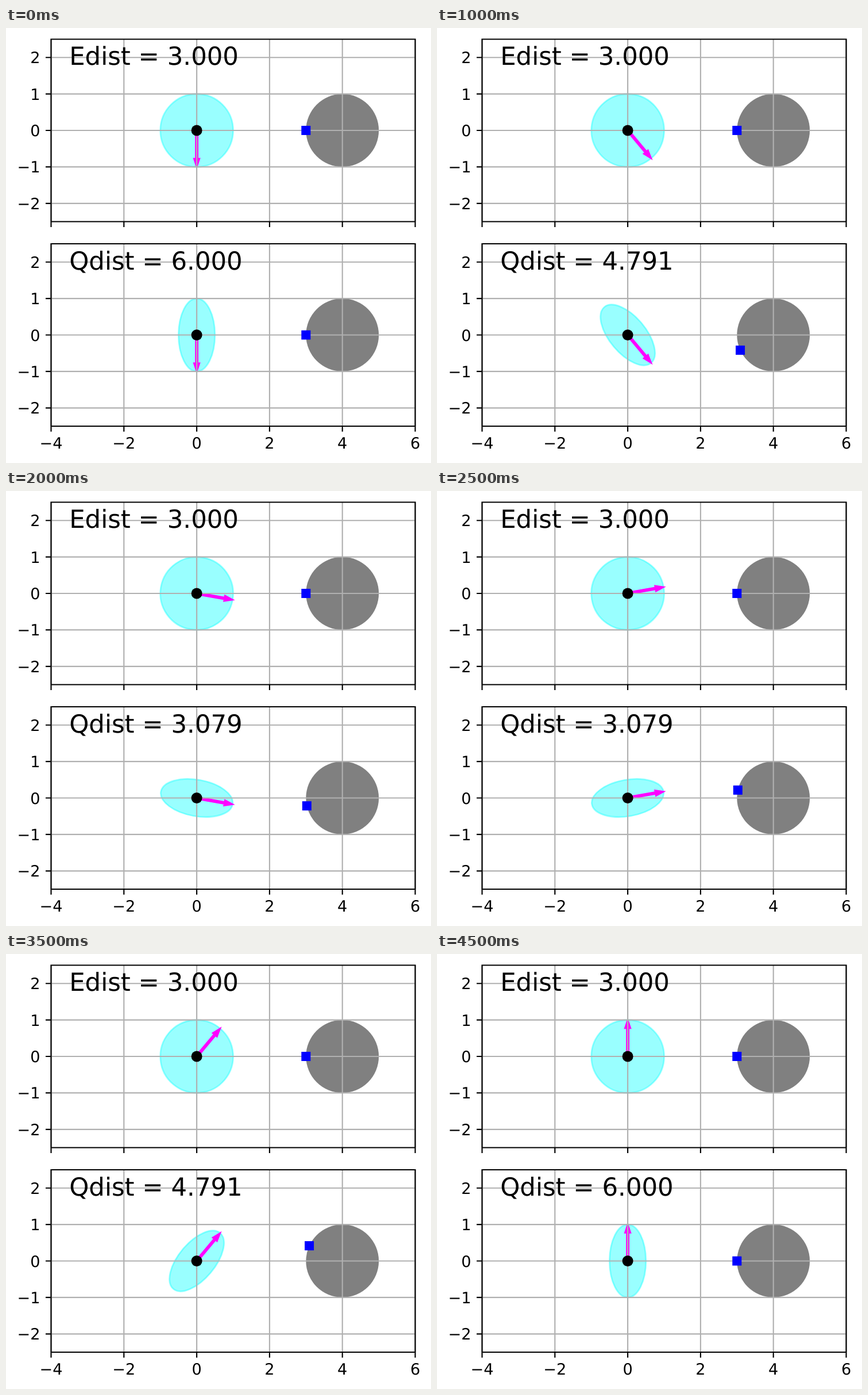
These frames come from a looping animation (740 by 756 pixels, 5000 ms). An HTML page:

```html
<!DOCTYPE html>
<html lang="en">
<head>
<meta charset="utf-8">
<title>Euclidean and elliptical distance</title>
<style>
  html, body { margin: 0; width: 100%; height: 100%; overflow: hidden; background: #fff; }
  svg { display: block; width: 740px; height: 756px; }
  text { font-family: "DejaVu Sans", sans-serif; font-size: 27.1px; text-rendering: geometricPrecision; }
  .readout { font-size: 43.4px; }
  .grid, .axis { fill: none; stroke-width: 2.15; }
  .grid { stroke: #b0b0b0; }
  .axis { stroke: #000; }
  .obstacle { fill: #808080; }
  .body { fill: #0ff; fill-opacity: .4; stroke: #0ff; stroke-opacity: .4; stroke-width: 2.7; }
  .arrow { fill: #f0f; stroke: #f0f; stroke-width: 2.7; }
  .nearest { fill: #00f; }
</style>
</head>
<body>
<svg viewBox="0 0 740 756"></svg>
<script>
const UNIT = 63.4, LEFT = 78.5, RIGHT = 712.5, ORIGIN_X = 332.1;
const STEP_MS = 500, STEPS = 10;
const svg = document.querySelector('svg');
const px = x => ORIGIN_X + x * UNIT;

function add(parent, tag, attrs, text) {
  const el = document.createElementNS('http://www.w3.org/2000/svg', tag);
  for (const key in attrs) el.setAttribute(key, attrs[key]);
  if (text !== undefined) el.textContent = text;
  parent.append(el);
  return el;
}

const label = n => String(n).replace('-', '\u2212');

// Arrow along +x: unit length including the head, in pixels.
function arrowPath(width = 0.05) {
  const shaft = width / 2 * UNIT, head = shaft * 3, neck = UNIT - head * 3;
  return `M0 ${-shaft}H${neck}V${-head}L${UNIT} 0L${neck} ${head}V${shaft}H0Z`;
}

function makePanel(name, originY, minorAxis, showXLabels) {
  const top = originY - 2.5 * UNIT, bottom = originY + 2.5 * UNIT;
  const py = y => originY - y * UNIT;
  const xs = [-4, -2, 0, 2, 4, 6], ys = [-2, -1, 0, 1, 2];

  add(svg, 'circle', { class: 'obstacle', cx: px(4), cy: originY, r: UNIT });
  const turning = add(svg, 'g', {});
  add(turning, 'ellipse', { class: 'body', rx: UNIT, ry: UNIT * minorAxis });
  add(turning, 'path', { class: 'arrow', d: arrowPath() });

  add(svg, 'path', { class: 'grid', d:
    xs.map(x => `M${px(x)} ${top}V${bottom}`).join('') +
    ys.map(y => `M${LEFT} ${py(y)}H${RIGHT}`).join('') });
  add(svg, 'path', { class: 'axis', d:
    `M${LEFT} ${top}H${RIGHT}V${bottom}H${LEFT}Z` +
    xs.map(x => `M${px(x)} ${bottom}v9.5`).join('') +
    ys.map(y => `M${LEFT} ${py(y)}h-9.5`).join('') });

  for (const y of ys)
    add(svg, 'text', { x: 59.5, y: py(y) + 10, 'text-anchor': 'end' }, label(y));
  if (showXLabels) for (const x of xs)
    add(svg, 'text', { x: px(x), y: bottom + 39.3, 'text-anchor': 'middle' }, label(x));

  add(svg, 'circle', { cx: px(0), cy: originY, r: 9.5 });
  const nearest = add(svg, 'rect', { class: 'nearest', width: 16, height: 16 });
  const readout = add(svg, 'text', { class: 'readout', x: px(-3.5), y: py(1.8) + 0.4 });

  return angle => {
    const best = closest(angle, minorAxis);
    turning.setAttribute('transform',
      `translate(${px(0)} ${originY}) rotate(${-angle * 180 / Math.PI})`);
    nearest.setAttribute('x', px(best.x) - 8);
    nearest.setAttribute('y', py(best.y) - 8);
    readout.textContent = `${name} = ${best.dist.toFixed(3)}`;
  };
}

// Point of the obstacle's rim with the least distance in the ellipse's metric.
function closest(angle, minorAxis) {
  const c = Math.cos(angle), s = Math.sin(angle);
  let best = { dist: Infinity };
  for (let i = -1000; i <= 1000; i++) {
    const x = 4 - Math.cos(i / 1000), y = Math.sin(i / 1000);
    const dist = Math.hypot(x * c + y * s, (y * c - x * s) / minorAxis);
    if (dist < best.dist) best = { x, y, dist };
  }
  return best;
}

const panels = [
  makePanel('Edist', 178, 1, false),
  makePanel('Qdist', 533.5, 0.5, true)
];

let shown = -1;
const start = performance.now();
function frame(now) {
  const step = Math.floor(Math.max(0, now - start) / STEP_MS) % STEPS;
  if (step !== shown) {
    shown = step;
    panels.forEach(update => update((step * 20 - 90) * Math.PI / 180));
  }
  requestAnimationFrame(frame);
}
frame(start);
</script>
</body>
</html>
```
